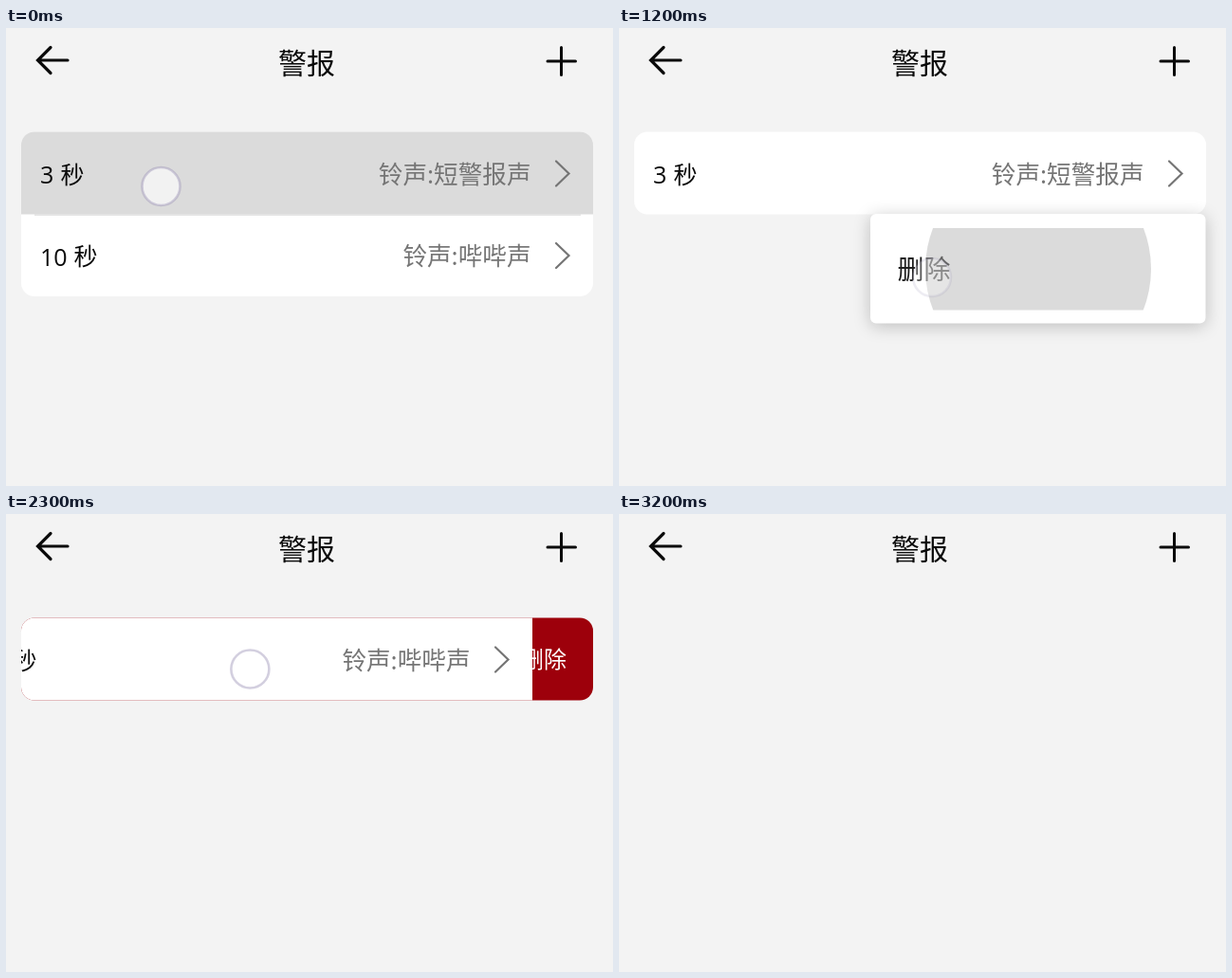
Write an HTML page with a canvas that moves like this. It is 640 by 483 pixels and loops after 4000 ms.

```html
<!DOCTYPE html>
<html lang="zh">
<head>
<meta charset="utf-8">
<style>
html, body { margin: 0; height: 100%; overflow: hidden; background: #f3f3f3; }
canvas { display: block; }
</style>
</head>
<body>
<canvas id="stage" width="640" height="483"></canvas>
<script>
const g = document.getElementById('stage').getContext('2d');
const LOOP = 4000, STEP = 100;
const INK = '#0a0a0a', GRAY = '#757575', WHITE = '#fff', RED = '#9d000b';
const CJK = '"Noto Sans CJK SC", "Noto Sans CJK", sans-serif';
const card = { x: 16, y: 109.5, w: 603, h: 87, r: 14 };
const popup = { x: 265, y: 196, w: 353.5, h: 115.5, r: 6 };

const ramp = (t, start, length) => Math.min(1, Math.max(0, (t - start) / length));
const mix = (a, b, p) => a + (b - a) * p;
const smooth = p => p * p * (3 - 2 * p);

function text(str, x, y, size, color, align = 'left', family = CJK) {
  g.font = `${size}px ${family}`;
  g.fillStyle = color;
  g.textAlign = align;
  g.fillText(str, x, y);
}

function stroke(path, color, width) {
  g.strokeStyle = color;
  g.lineWidth = width;
  g.lineCap = 'round';
  g.stroke(new Path2D(path));
}

function box({ x, y, w, h, r }, color) {
  g.beginPath();
  g.roundRect(x, y, w, h, r);
  g.fillStyle = color;
  g.fill();
}

function disc(x, y, r, color) {
  g.beginPath();
  g.arc(x, y, r, 0, 7);
  g.fillStyle = color;
  g.fill();
}

function header() {
  stroke('M47 20.5L33.5 34L47 47.5M34 34H65', INK, 3.2);
  stroke('M571 35H600.5M585.5 20.5V49.5', INK, 3);
  text('警报', 317, 47.5, 30, INK, 'center');
}

function row(seconds, tone) {
  const unitX = seconds > 9 ? 71.5 : 57.5;
  text(seconds, 36, 164, 25, INK, 'left', '"Open Sans", sans-serif');
  text('秒', unitX, 163.5, 25, INK);
  text('铃声:' + tone, 553.5, 163.5, 25.6, GRAY, 'right');
  stroke('M580 140.5L593.5 153.5L580 166.5', GRAY, 2.2);
}

function list(t) {
  const both = t < 1200;
  box({ ...card, h: both ? 2 * card.h - 0.5 : card.h }, WHITE);
  g.globalAlpha = 1 - ramp(t, 200, 200);
  box({ ...card, r: [card.r, card.r, 0, 0] }, '#dbdbdb');
  g.globalAlpha = 1;
  row(3, '短警报声');
  if (!both) return;
  g.fillStyle = '#e4e4e4';
  g.fillRect(30, 196, 576, 2);
  g.save();
  g.translate(0, 86.5);
  row(10, '哔哔声');
  g.restore();
}

function swipeRow(t) {
  const shift = t < 2300 ? 0 : -226 - 1.62 * (t - 2400);
  const edge = card.x + card.w + shift;
  box(card, shift ? RED : WHITE);
  text('删除', 543, 162, 24, WHITE);
  g.save();
  g.beginPath();
  g.rect(0, 0, edge, 483);
  g.clip();
  box(card, WHITE);
  g.clip();
  g.translate(shift, 0);
  row(10, '哔哔声');
  g.restore();
}

function menu(t) {
  g.save();
  g.globalAlpha = ramp(t, 100, 200) * (1 - ramp(t, 1200, 200));
  g.shadowColor = 'rgba(0,0,0,.22)';
  g.shadowBlur = 18;
  g.shadowOffsetY = 3;
  box(popup, WHITE);
  g.shadowColor = 'transparent';
  text('删除', 293.5, 265, 28, '#1c1c1c');
  // Touch ripple grows while drifting to the middle
  const p = ramp(t, 1000, 200);
  g.beginPath();
  g.rect(popup.x, 211, popup.w, 86.5);
  g.clip();
  disc(mix(330, 442, p), 254, 0.595 * Math.max(0, t - 1000), 'rgba(178,178,178,.47)');
  g.restore();
}

function pointer(x, y, alpha) {
  g.globalAlpha = alpha;
  disc(x, y, 20, 'rgba(255,255,255,.65)');
  g.strokeStyle = 'rgba(150,142,180,.42)';
  g.lineWidth = 2.6;
  g.stroke();
  g.globalAlpha = 1;
}

function touch(t) {
  if (t < 1300) {
    const drift = ramp(t, 0, 400), p = smooth(ramp(t, 400, 600));
    pointer(mix(163.5 + 3 * drift, 330, p), mix(167 + drift, 263, p), 1 - 0.6 * ramp(t, 1100, 100));
  } else if (t >= 2300 && t < 2700) {
    const left = (2600 - t) / 200;
    pointer(6.5 + 111.5 * left * left, 139.5 + 16 * left, 1);
  }
}

function draw(now) {
  const t = Math.floor(now % LOOP / STEP) * STEP;
  g.fillStyle = '#f3f3f3';
  g.fillRect(0, 0, 640, 483);
  header();
  if (t < 1300) list(t);
  else if (t < 2700) swipeRow(t);
  menu(t);
  touch(t);
}

const start = performance.now();
function tick(now) {
  draw(Math.max(0, now - start));
  requestAnimationFrame(tick);
}
draw(0);
requestAnimationFrame(tick);
</script>
</body>
</html>
```
